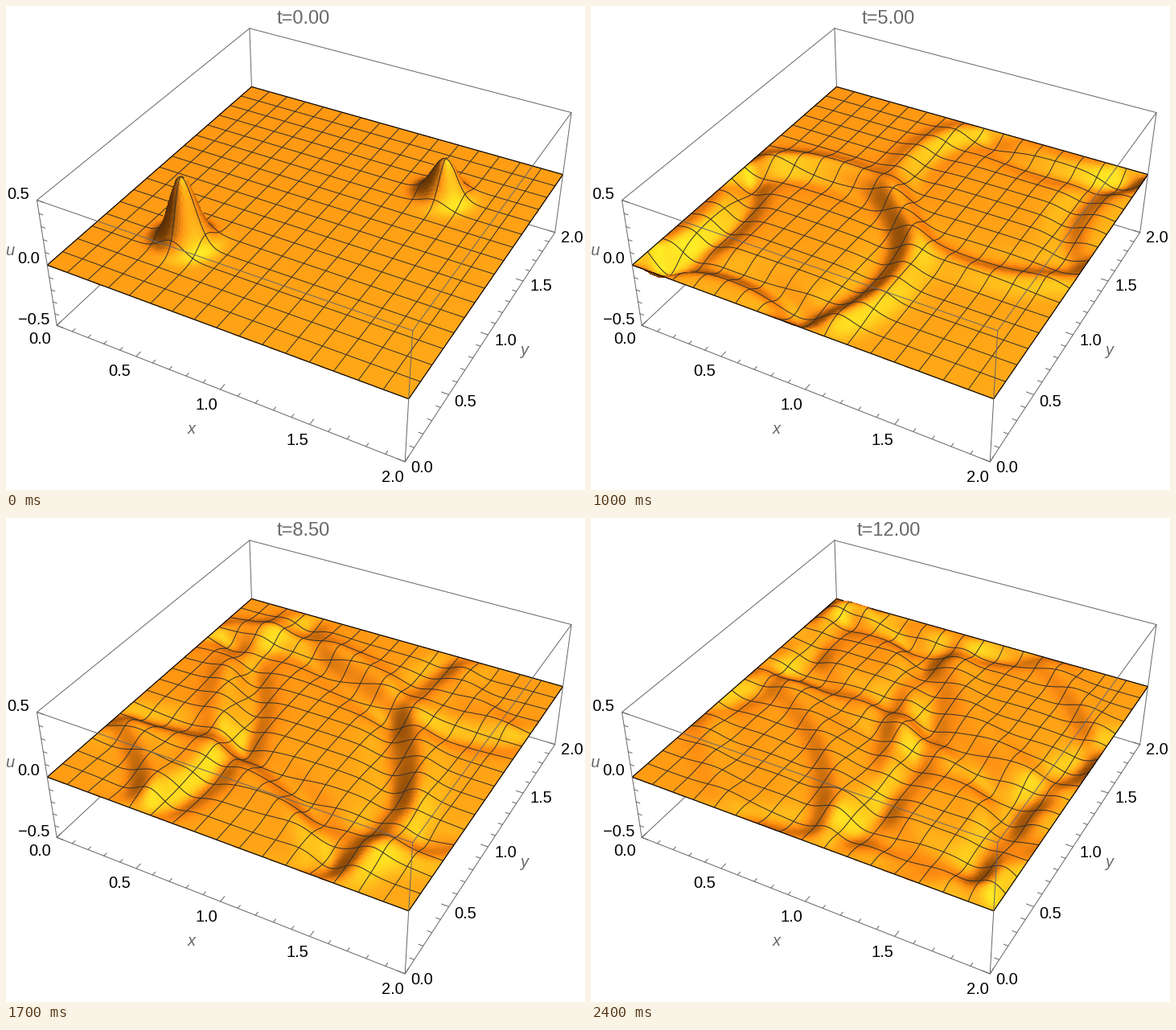
A matplotlib script that plays this animation: 720 by 602 pixels, repeating every 2.5 s.

```python
import numpy as np
import matplotlib.pyplot as plt
from matplotlib.animation import FuncAnimation
from matplotlib.collections import LineCollection

W, H, DPI = 720, 602, 100
FRAMES, INTERVAL, DT = 25, 100, 0.5
SIDE, SPEED = 2.0, 0.14
CELLS, MESH = 160, 16
PULSES = [(0.5, 0.5, 0.5), (0.3, 1.5, 1.5)]  # amplitude, x, y
SHARP = 100

GREY, MESH_COLOR = "#686868", "#34302a"
BASE = np.array([0.8807, 0.6110, 0.1421])
AMBIENT = np.array([0.3010, 0.2241, 0.0905])
LIGHT = np.array([0.2642, 0.1833, 0.0426])


def unit(v):
    return v / np.linalg.norm(v, axis=-1, keepdims=True)


# Camera looks at the centre of a 1 x 1 x 0.4 box
EYE = np.array([1.3, -2.4, 2.0])
TOWARD = unit(EYE)
RIGHT = unit(np.cross([0, 0, 1], TOWARD))
UP = np.cross(TOWARD, RIGHT)
CAM = np.array([RIGHT, UP, TOWARD])
LAMPS = unit(np.array([[0, 1, 1], [1, 1, 1], [1, 0, 1]]) @ CAM)
SCALE, CX, CY = 1597, 387.3, 263.2


def to_box(x, y, u):
    x, y, u = np.broadcast_arrays(x, y, u)
    return np.stack([x / SIDE - 0.5, y / SIDE - 0.5, 0.4 * u], axis=-1)


def project(p):
    r, v, near = np.moveaxis(p @ CAM.T, -1, 0)
    depth = np.linalg.norm(EYE) - near
    return np.stack([CX + SCALE * r / depth, CY - SCALE * v / depth], axis=-1)


# Wave equation with fixed edges, solved by a sine series
q = np.arange(1, 49) * np.pi / SIDE
xs = np.linspace(0, SIDE, CELLS + 1)
ys = xs[::-1]  # back to front, so nearer cells are painted last
sin_x, sin_y = np.sin(np.outer(q, xs)), np.sin(np.outer(q, ys))
omega = SPEED * np.hypot(q[:, None], q[None, :])


def bump(c):
    return np.sqrt(np.pi / SHARP) * np.exp(-q**2 / (4 * SHARP)) * np.sin(q * c)


coef = sum(a * np.outer(bump(y), bump(x)) for a, x, y in PULSES)


def wave(t):
    return sin_y.T @ (coef * np.cos(omega * t)) @ sin_x


def shade(p, u):
    uy, ux = np.gradient(u, ys, xs)
    k = 0.4 * SIDE
    n = unit(np.stack([-k * ux, -k * uy, np.ones_like(u)], axis=-1))
    view = unit(EYE - p)
    rgb = np.zeros(u.shape + (3,)) + AMBIENT * BASE
    for lamp in LAMPS:
        diff = np.clip(n @ lamp, 0, None)
        spec = np.clip((n * unit(view + lamp)).sum(-1), 0, None) ** 3 * (diff > 0)
        rgb += LIGHT * (BASE * diff[..., None] + spec[..., None])
    rgb = np.clip(rgb, 0, 1)
    return (rgb[1:, 1:] + rgb[:-1, 1:] + rgb[1:, :-1] + rgb[:-1, :-1]) / 4


def height(z, x, y):
    """Bilinear lookup of box heights, very low outside the surface."""
    c, r = (x + 0.5) * CELLS, (0.5 - y) * CELLS
    inside = (c >= 0) & (c <= CELLS) & (r >= 0) & (r <= CELLS)
    i = np.clip(c.astype(int), 0, CELLS - 1)
    j = np.clip(r.astype(int), 0, CELLS - 1)
    a, b = c - i, r - j
    top = z[j, i] * (1 - a) + z[j, i + 1] * a
    low = z[j + 1, i] * (1 - a) + z[j + 1, i + 1] * a
    return np.where(inside, top * (1 - b) + low * b, -9)


steps = np.linspace(0.004, 0.14, 60)[:, None, None, None]


def mesh_lines(p):
    gap = CELLS // MESH
    lines = np.concatenate([p[::gap], p[:, ::gap].swapaxes(0, 1)])
    ray = lines + steps * (EYE - lines)
    hidden = height(p[..., 2], ray[..., 0], ray[..., 1]) > ray[..., 2] + 1e-3
    pts = project(lines)
    pts[hidden.any(axis=0)] = np.nan
    return pts


fig = plt.figure(figsize=(W / DPI, H / DPI), dpi=DPI, facecolor="white")
ax = fig.add_axes([0, 0, 1, 1])
ax.set_xlim(0, W)
ax.set_ylim(H, 0)
ax.axis("off")


def px(n):
    return n * 72 / DPI


def label(x, y, s, size=20, color="black", **kw):
    return ax.text(x, y, s, fontsize=px(size), color=color, family="Liberation Sans",
                   ha="center", va="center_baseline", zorder=6, **kw)


def stroke(a, b, z):
    pts = project(np.array([a, b], float))
    ax.plot(pts[:, 0], pts[:, 1], color=GREY, lw=px(1), zorder=z, solid_capstyle="round")


def draw_box():
    h, t = 0.5, 0.2
    ring = [(-h, -h), (h, -h), (h, h), (-h, h)]
    for i, a in enumerate(ring):
        b = ring[(i + 1) % 4]
        stroke((*a, -t), (*b, -t), 1)
        stroke((*a, t), (*b, t), 5 if i < 2 else 1)
        stroke((*a, -t), (*a, t), 1 if i == 3 else 5)


def draw_ticks():
    for i in range(21):
        s = i / 20 - 0.5
        n = 0.02 if i % 5 == 0 else 0.012
        stroke((s, -0.5, -0.2), (s, -0.5 + n, -0.2), 1)
        stroke((0.5, s, -0.2), (0.5 - n, s, -0.2), 1)
    for i in range(11):
        n = 0.02 if i % 5 == 0 else 0.012
        z = 0.04 * i - 0.2
        stroke((-0.5, -0.5, z), (-0.5 + n, -0.5, z), 1)


def draw_labels():
    x_spots = [(42, 413), (141, 453), (249, 494), (362, 539), (481, 585)]
    y_spots = [(517, 572), (571, 490), (621, 414), (665, 347), (704, 286)]
    for spots in (x_spots, y_spots):
        for i, (x, y) in enumerate(spots):
            label(x, y, f"{i / 2:.1f}")
    label(15, 232, "0.5")
    label(28, 312, "0.0")
    label(35, 388, "\u22120.5")
    for x, y, s in [(231, 524, "x"), (644, 426, "y"), (5, 302, "u")]:
        label(x, y, s, color=GREY, style="italic")


draw_box()
draw_ticks()
draw_labels()
title = label(370, 14, "", size=23.6, color=GREY)

edge = np.arange(MESH + 1) % MESH == 0
styles = ["black" if e else MESH_COLOR for e in np.tile(edge, 2)]
widths = [px(1.2 if e else 1) for e in np.tile(edge, 2)]
grid = LineCollection([], colors=styles, linewidths=widths, zorder=3)
ax.add_collection(grid, autolim=False)
surface = None


def update(i):
    global surface
    t = i * DT
    u = wave(t)
    p = to_box(xs[None, :], ys[:, None], u)
    pts = project(p)
    if surface is not None:
        surface.remove()
    surface = ax.pcolormesh(pts[..., 0], pts[..., 1], shade(p, u),
                            shading="flat", antialiased=False, zorder=2)
    grid.set_segments(mesh_lines(p))
    # The clock keeps two significant digits
    shown = t if t < 10 else np.floor(t + 0.5)
    title.set_text(f"t={shown:.2f}")
    return surface, grid, title


anim = FuncAnimation(fig, update, frames=FRAMES, interval=INTERVAL,
                     repeat=True, repeat_delay=0, blit=False)
plt.show()
```
